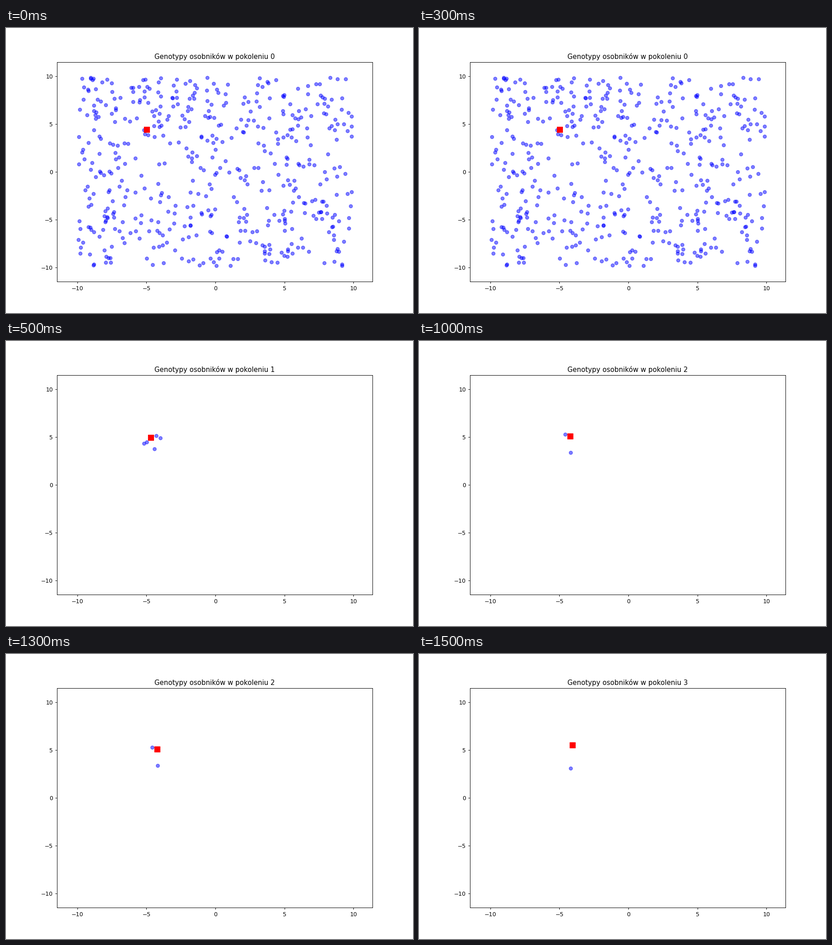
Write a matplotlib script that moves like this. It is 894 px wide and 626 px high and loops after 2 s.

```python
import numpy as np
import matplotlib.pyplot as plt
from matplotlib.animation import FuncAnimation

DPI = 89.4
LIMIT = 9.95

plt.rcParams["font.family"] = "DejaVu Sans"

rng = np.random.default_rng(12)

# (population, best individual) per generation
GENERATIONS = [
    (rng.uniform(-LIMIT, LIMIT, (500, 2)), (-4.97, 4.43)),
    ([(-4.29, 5.14), (-3.99, 4.90), (-4.98, 4.50), (-5.17, 4.33), (-4.42, 3.74)],
     (-4.67, 4.93)),
    ([(-4.57, 5.28), (-4.19, 3.36)], (-4.22, 5.10)),
    ([(-4.19, 3.10)], (-4.05, 5.53)),
]

fig, ax = plt.subplots(figsize=(894 / DPI, 626 / DPI), dpi=DPI)
ax.set(xlim=(-11.49, 11.37), ylim=(-11.48, 11.47),
       xticks=range(-10, 11, 5), yticks=range(-10, 11, 5))

dots = ax.scatter([], [], c="blue", alpha=0.5)
best = ax.scatter([], [], c="red", marker="s", s=100, zorder=3)
title = ax.set_title("")


def draw(gen):
    population, leader = GENERATIONS[gen]
    dots.set_offsets(population)
    best.set_offsets([leader])
    title.set_text(f"Genotypy osobników w pokoleniu {gen}")
    return dots, best, title


anim = FuncAnimation(fig, draw, frames=len(GENERATIONS), interval=500,
                     repeat=True, repeat_delay=0)
plt.show()
```
